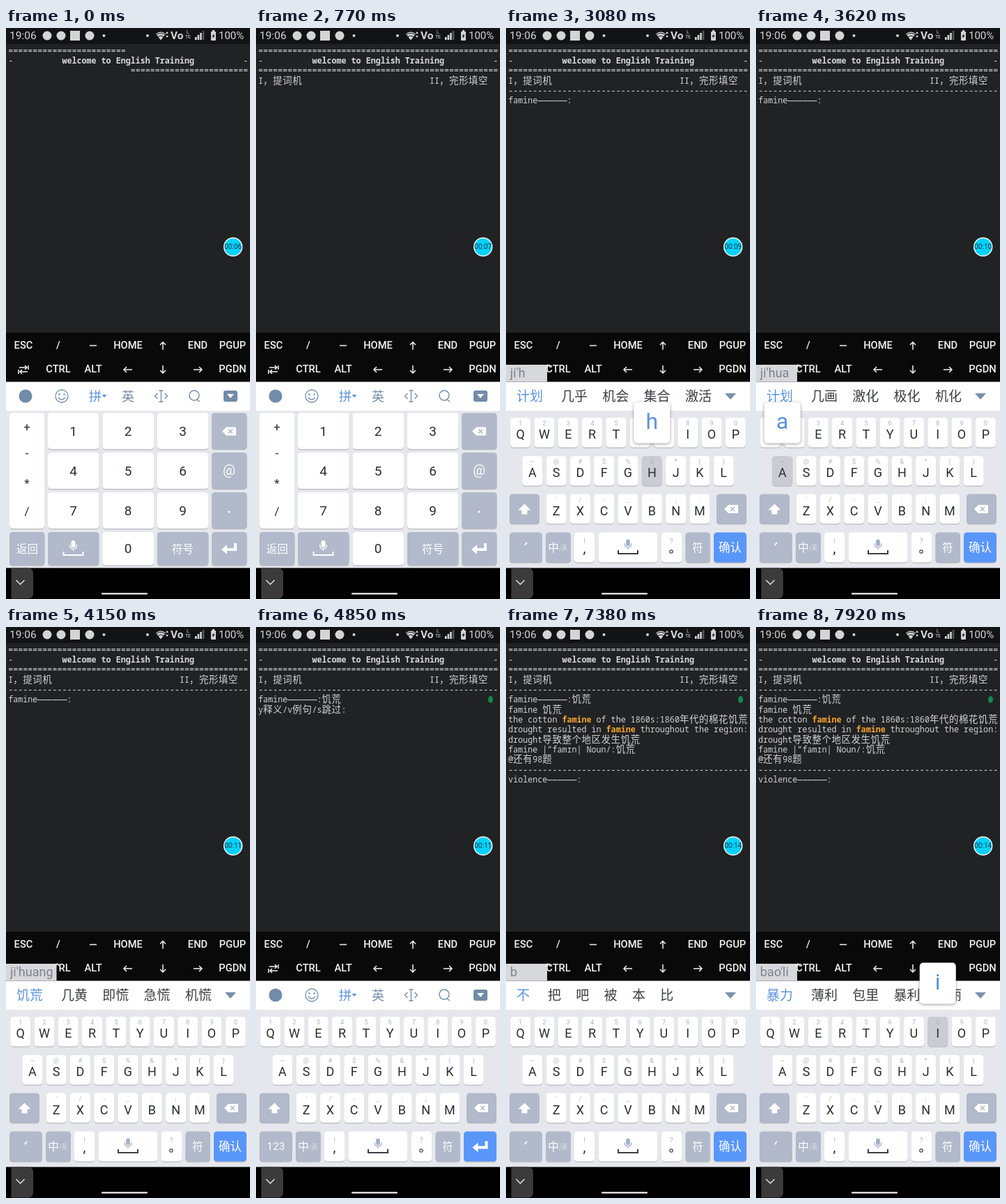
Recreate the animation shown at these times as an HTML page with a canvas. Size 350x819 px, loop 8 s.

```html
<!DOCTYPE html>
<html lang="zh-CN">
<head>
<meta charset="utf-8">
<style>
html, body { margin: 0; width: 350px; height: 819px; overflow: hidden; background: #000; }
canvas { display: block; }
</style>
</head>
<body>
<canvas id="stage" width="350" height="819"></canvas>
<script>
const ctx = document.getElementById('stage').getContext('2d');
const LOOP = 8000, CELL = 7.02, ROW = 14.33, KEY_PITCH = 34.3;
const UI = 'Roboto, sans-serif';
const CJK = '"Noto Sans CJK SC", "Noto Sans CJK", sans-serif';
const MONO = '"Noto Sans Mono", monospace';
const GREY = '#b1b9ca', BLUE = '#5b93dc', STEEL = '#728ba9', INK = '#2b2c30';

// Typed letters: key, press, release, composition, candidates
const words = [
  { end: 4460, keys: [
    ['j', 2770, 2850, 'j', '就 将 及 几 家 经'],
    ['i', 2920, 3000, 'ji', '及 即 几 级 记 机'],
    ['h', 3080, 3230, "ji'h", '计划 几乎 机会 集合 激活'],
    ['u', 3380, 3460, "ji'hu", '几乎 记户 积户 集户 机护'],
    ['a', 3540, 3690, "ji'hua", '计划 几画 激化 极化 机化'],
    ['n', 3690, 3850, "ji'huan", '几环 机缓 激换 即还 极环'],
    ['g', 3920, 4000, "ji'huang", '饥荒 几黄 即慌 急慌 机慌']] },
  { end: 5310, keys: [['y', 5080, 5150, 'y', '一 有 也 要 与 用']] },
  { end: LOOP, keys: [
    ['b', 7310, 7380, 'b', '不 把 吧 被 本 比'],
    ['a', 7460, 7540, 'ba', '把 吧 爸 八 罢 拔'],
    ['o', 7620, 7690, 'bao', '报 包 宝 保 抱 爆'],
    ['l', 7770, 7850, "bao'l", '暴露 保留 爆裂 保龄 堡垒'],
    ['i', 7920, LOOP, "bao'li", '暴力 薄利 包里 暴利 暴丽']] }
];
const letterRows = [
  { keys: 'QWERTYUIOP', hints: '1234567890', y: 559 },
  { keys: 'ASDFGHJKL', hints: '~@#$%&*()', y: 614 },
  { keys: 'ZXCVBNM', hints: "'/-_:;·", y: 668.5 }
];
const keyX = (row, i) => 175 + KEY_PITCH * (i - (row.keys.length - 1) / 2);

function text(str, x, y, size, color, { family = UI, weight = 400, align = 'center' } = {}) {
  ctx.font = `${weight} ${size}px ${family}`;
  ctx.fillStyle = color;
  ctx.textAlign = align;
  ctx.textBaseline = 'middle';
  ctx.fillText(str, x, y);
}
const han = (str, x, y, size, color, align) => text(str, x, y, size, color, { family: CJK, align });

function rect(x, y, w, h, color, radius = 0) {
  ctx.fillStyle = color;
  ctx.beginPath();
  ctx.roundRect(x, y, w, h, radius);
  ctx.fill();
}
function disc(x, y, rx, color, ry = rx) {
  ctx.fillStyle = color;
  ctx.beginPath();
  ctx.ellipse(x, y, rx, ry, 0, 0, 7);
  ctx.fill();
}
// SVG path drawn around a centre
function shape(d, x, y, color, lineWidth) {
  ctx.save();
  ctx.translate(x, y);
  ctx.lineWidth = lineWidth || 1;
  ctx.fillStyle = ctx.strokeStyle = color;
  ctx[lineWidth ? 'stroke' : 'fill'](new Path2D(d));
  ctx.restore();
}
function key(x, y, w, h, color, down) {
  rect(x, y + 1.2, w, h, '#0003', 4.5);
  rect(x, y, w, h, down ? '#cbccd3' : color, 4.5);
}
function term(row, col, str, color = '#d2d3d5', weight = 400) {
  ctx.textAlign = 'left';
  ctx.textBaseline = 'alphabetic';
  ctx.fillStyle = color;
  for (const ch of str) {
    const wide = /[\u2e80-\uffff]/.test(ch);
    ctx.font = wide ? `13.4px ${CJK}` : `${weight} 11.7px ${MONO}`;
    ctx.fillText(ch, 3.2 + col * CELL, 36.8 + row * ROW);
    col += wide ? 2 : 1;
  }
}

function backspace(x, y) {
  shape('M-10 0L-4-6H9Q10-6 10-5V5Q10 6 9 6H-4Z', x, y, '#fff');
  shape('M-1-3L5 3M5-3L-1 3', x, y, GREY, 1.6);
}
function enter(x, y) {
  shape('M9-7V2H-5', x, y, '#fff', 4);
  shape('M-11 2L-3-5V9Z', x, y, '#fff');
}
function mic(x, y, color, bracket, scale) {
  rect(x - 3 * scale, y - 10 * scale, 6 * scale, 10 * scale, color, 3 * scale);
  shape('M-5-4Q-5 2 0 2T5-4M0 2V5', x, y, color, 1.2);
  shape('M-14 6V11H14V6', x, y, bracket, 2);
}

function statusBar() {
  rect(0, 0, 350, 23, '#111315');
  const c = '#d4d4d4';
  text('19:06', 5, 11.5, 15.5, c, { align: 'left' });
  disc(59, 11, 6.5, c);
  disc(79, 11, 6.5, c);
  rect(92, 4, 14, 14, c);
  disc(120, 11, 6.5, c);
  disc(140.5, 11, 2, c);
  disc(203, 11, 2, c);
  shape('M0 7L-7-2Q0-8 7-2Z', 222, 10.5, c);
  shape('M-6-1Q0-5 6-1M-4 2Q0-1 4 2', 222, 10.5, '#111315', 1);
  shape('M0-5L2-2H-2ZM0 4L2 1H-2Z', 231, 10, c);
  text('Vo', 236, 11, 15.5, c, { align: 'left', weight: 700 });
  text('L', 261, 6, 7, c);
  text('TE', 261, 13, 7, c);
  [4, 7, 10, 13].forEach((h, i) => rect(271 + i * 3.6, 17 - h, 2.6, h, i < 3 ? c : '#555'));
  rect(294, 5, 7, 13, c, 1);
  rect(296, 3, 3, 2, c);
  shape('M1-4L-2 1H0L-1 4L2-1H0Z', 297.5, 11.5, '#000');
  text('100%', 305, 11.5, 15, c, { align: 'left' });
}

function terminal(t) {
  rect(0, 23, 350, 414, '#212224');
  const n = Math.min(49, 24 + Math.floor(Math.floor(t / 77 + 0.1) * 3.13));
  term(0, 0, '='.repeat(n));
  term(1, 0, '-');
  term(1, 11, 'welcome to English Training', '#d8d8da', 600);
  term(1, 48, '-');
  term(2, 49 - n, '='.repeat(n));
  if (t >= 770) {
    term(3, 0, 'I，提词机');
    term(3, 35, 'II，完形填空');
  }
  if (t >= 1000 && t < 1150) term(4, 0, '1');
  if (t >= 1150) {
    term(4, 0, '-'.repeat(49));
    term(5, 0, 'famine——————:');
  }
  if (t >= 4460) term(5, 13, '饥荒');
  if (t >= 4850) {
    disc(336.5, 104, 3.5, '#11894e', 5);
    if (t < 5620) term(6, 0, 'y释义/v例句/s跳过:' + (t >= 5310 ? 'y' : ''));
  }
  if (t >= 5620) {
    term(6, 0, 'famine 饥荒');
    term(7, 0, 'the cotton        of the 1860s:1860年代的棉花饥荒');
    term(7, 11, 'famine', '#f5a52c', 700);
    term(8, 0, 'drought resulted in        throughout the region:');
    term(8, 20, 'famine', '#f5a52c', 700);
    term(9, 0, 'drought导致整个地区发生饥荒');
    term(10, 0, 'famine |”famɪn| Noun/:饥荒');
    term(11, 0, '@还有98题');
    term(12, 0, '-'.repeat(49));
    term(13, 0, 'violence——————:');
  }
  disc(325.7, 314, 13.7, '#f2f5f6');
  disc(325.7, 314, 12.2, '#00d2fb');
  const seconds = 6 + Math.floor((t + 850) / 1000);
  text('00:' + String(seconds).padStart(2, '0'), 325.7, 314.5, 10, '#14384a');
}

function extraKeys() {
  rect(0, 437, 350, 71, '#09090a');
  const arrows = {
    '↑': 'M0 6V-5M-4-1L0-5L4-1', '↓': 'M0-6V5M-4 1L0 5L4 1',
    '←': 'M6 0H-6M-2-4L-6 0L-2 4', '→': 'M-6 0H6M2-4L6 0L2 4',
    '⇄': 'M-6-3H5M2-6L5-3L2 0M7-6V0M6 3H-5M-2 0L-5 3L-2 6M-7 0V6', '—': 'M-5 0H5'
  };
  ['ESC / — HOME ↑ END PGUP', '⇄ CTRL ALT ← ↓ → PGDN'].forEach((line, r) =>
    line.split(' ').forEach((label, i) => {
      const x = 25 + 50 * i, y = 455.5 + 34.5 * r;
      if (arrows[label]) shape(arrows[label], x, y, '#f3f3f3', 1.5);
      else text(label, x, y, 14.7, '#f3f3f3', { weight: 500 });
    }));
}

function toolbar() {
  rect(0, 507.5, 350, 41.5, '#fff');
  disc(28, 528, 9.5, STEEL);
  shape('M9 0A9 9 0 1 1-9 0A9 9 0 1 1 9 0M-5 2Q0 8 5 2', 80, 528, STEEL, 1.3);
  disc(76.5, 525.5, 1.2, STEEL);
  disc(83.5, 525.5, 1.2, STEEL);
  han('拼', 128, 528, 18.5, BLUE);
  shape('M-3.5-2H3.5L0 2Z', 141, 528, BLUE);
  han('英', 175, 528, 18, STEEL);
  shape('M-5-4L-9 0L-5 4M5-4L9 0L5 4M-3-8H3M0-8V8M-3 8H3', 222.5, 528, STEEL, 1.3);
  shape('M7-1A7 7 0 1 1-7-1A7 7 0 1 1 7-1M4 5L8 8', 270, 528, STEEL, 1.4);
  rect(312, 520, 20, 16, STEEL, 3);
  shape('M-5-2H5L0 4Z', 322, 527, '#fff');
}

function candidates(list) {
  rect(0, 507.5, 350, 41.5, '#fff');
  let x = 15;
  list.split(' ').forEach((word, i) => {
    han(word, x, 528, 19, i ? '#3b3d42' : BLUE, 'left');
    x += word.length * 19 + (i ? 21.3 : 26);
  });
  shape('M-8-4H8L0 5Z', 322, 528, '#7890ad');
}

function numberPad(t) {
  const cols = [60, 138.5, 217], rows = [552, 609, 666];
  key(5, 552, 50, 166, '#fff');
  ['+', '-', '*', '/'].forEach((s, i) => text(s, 30, [573, 611, 654, 694][i], 17, INK));
  rows.forEach((y, r) => {
    cols.forEach((x, c) => {
      const digit = r * 3 + c + 1;
      key(x, y, 73.5, 52, '#fff', digit === 1 && t >= 920 && t < 1000);
      text(digit, x + 36.5, y + 27, 19, INK);
    });
    key(295, y, 50.5, 52, GREY);
  });
  backspace(320, 578.5);
  text('@', 320, 635, 20, '#fff');
  disc(320, 694, 1.5, '#fff');
  key(5, 723, 50.5, 47.5, GREY, t >= 1620);
  han('返回', 30.5, 747, 15.5, '#fff');
  key(60, 723, 73.5, 47.5, GREY);
  mic(96.5, 745, '#fff', '#fff', 1);
  key(138.5, 723, 73.5, 47.5, '#fff');
  text('0', 175, 747.5, 19, INK);
  key(217, 723, 73.5, 47.5, GREY);
  han('符号', 253.5, 747, 15.5, '#fff');
  key(295, 723, 50.5, 47.5, GREY, t >= 1080 && t < 1150);
  enter(320, 746);
}

function letterPad(t, typed, pressed) {
  for (const row of letterRows) {
    [...row.keys].forEach((letter, i) => {
      const x = keyX(row, i);
      key(x - 14.5, row.y, 29, 42.5, '#fff', pressed && letter.toLowerCase() === typed[0]);
      text(row.hints[i], x, row.y + 8.5, 9.5, '#b3b5ba');
      text(letter, x, row.y + 25, 18, INK);
    });
  }
  key(5, 668.5, 43, 42.5, GREY);
  shape('M0-8L9 1H4V7H-4V1H-9Z', 26.5, 690.5, '#fff');
  key(302, 668.5, 43, 42.5, GREY);
  backspace(323, 690);

  key(5, 723.5, 47, 43, GREY);
  if (typed) shape('M2-4L-1 0', 28, 742, '#fff', 1.8);
  else text('123', 28.5, 745.5, 15.5, '#fff');
  key(57, 723.5, 36, 43, GREY);
  han('中', 68, 745, 15.5, '#fff');
  han('/英', 82, 746, 9, '#dde1ea');
  key(98, 723.5, 29, 43, '#fff');
  text('!', 112.5, 737, 10, '#b3b5ba');
  text(',', 112.5, 747, 20, INK);
  key(132.5, 723.5, 85, 43, '#fff');
  mic(175, 743, '#a3afc4', '#3d3f45', 0.95);
  key(223, 723.5, 29, 43, '#fff');
  text('?', 237, 737, 10, '#b3b5ba');
  shape('M2.2 0A2.2 2.2 0 1 1-2.2 0A2.2 2.2 0 1 1 2.2 0', 237, 751, INK, 1.1);
  key(257.5, 723.5, 35.5, 43, GREY);
  han('符', 275, 745, 15.5, '#fff');
  const entering = (t >= 4770 && t < 4850) || (t >= 5540 && t < 5690);
  key(298, 723.5, 47, 43, entering ? '#4a7fd6' : '#5996fa');
  if (typed) han('确认', 321.5, 745, 16.5, '#fff');
  else enter(321.5, 744.5);
}

function composition(str) {
  ctx.font = `18px ${UI}`;
  const width = Math.max(59, ctx.measureText(str).width + 11);
  rect(0, 483, width, 24.5, '#d7d8db');
  text(str, 6, 495.5, 18, '#7c838e', { align: 'left' });
  shape('M-4 3L0-1L4 3', width + 1, 484, '#e8e8e8', 1.5);
}

function popup(letter) {
  const row = letterRows.find(r => r.keys.includes(letter.toUpperCase()));
  const x = keyX(row, row.keys.indexOf(letter.toUpperCase())), y = row.y - 77.5;
  ctx.save();
  ctx.shadowColor = '#0006';
  ctx.shadowBlur = 4;
  ctx.shadowOffsetY = 1;
  rect(x - 26, y, 52, 59, '#fff', 5);
  ctx.restore();
  text(letter, x, y + 29, 32, BLUE);
}

function bottomBar() {
  rect(0, 774.5, 350, 45, '#000');
  rect(7.5, 774.5, 31.5, 44, '#3b3b3b', [0, 7, 7, 0]);
  shape('M-6-3L0 3L6-3', 20.5, 795, '#e4e4e4', 1.5);
  rect(137, 810.2, 66, 2.2, '#f0f0f0', 1);
}

function draw(now) {
  const t = now % LOOP;
  const word = words.find(w => t >= w.keys[0][1] && t < w.end);
  const typed = word && word.keys.filter(k => t >= k[1]).pop();
  const pressed = typed && t < typed[2];
  statusBar();
  terminal(t);
  extraKeys();
  rect(0, 549, 350, 226, '#e5e7ec');
  if (typed) {
    candidates(typed[4]);
    composition(typed[3]);
  } else toolbar();
  if (t < 1770) numberPad(t);
  else letterPad(t, typed, pressed);
  bottomBar();
  if (pressed) popup(typed[0]);
  requestAnimationFrame(() => draw(performance.now()));
}
draw(performance.now());
</script>
</body>
</html>
```
